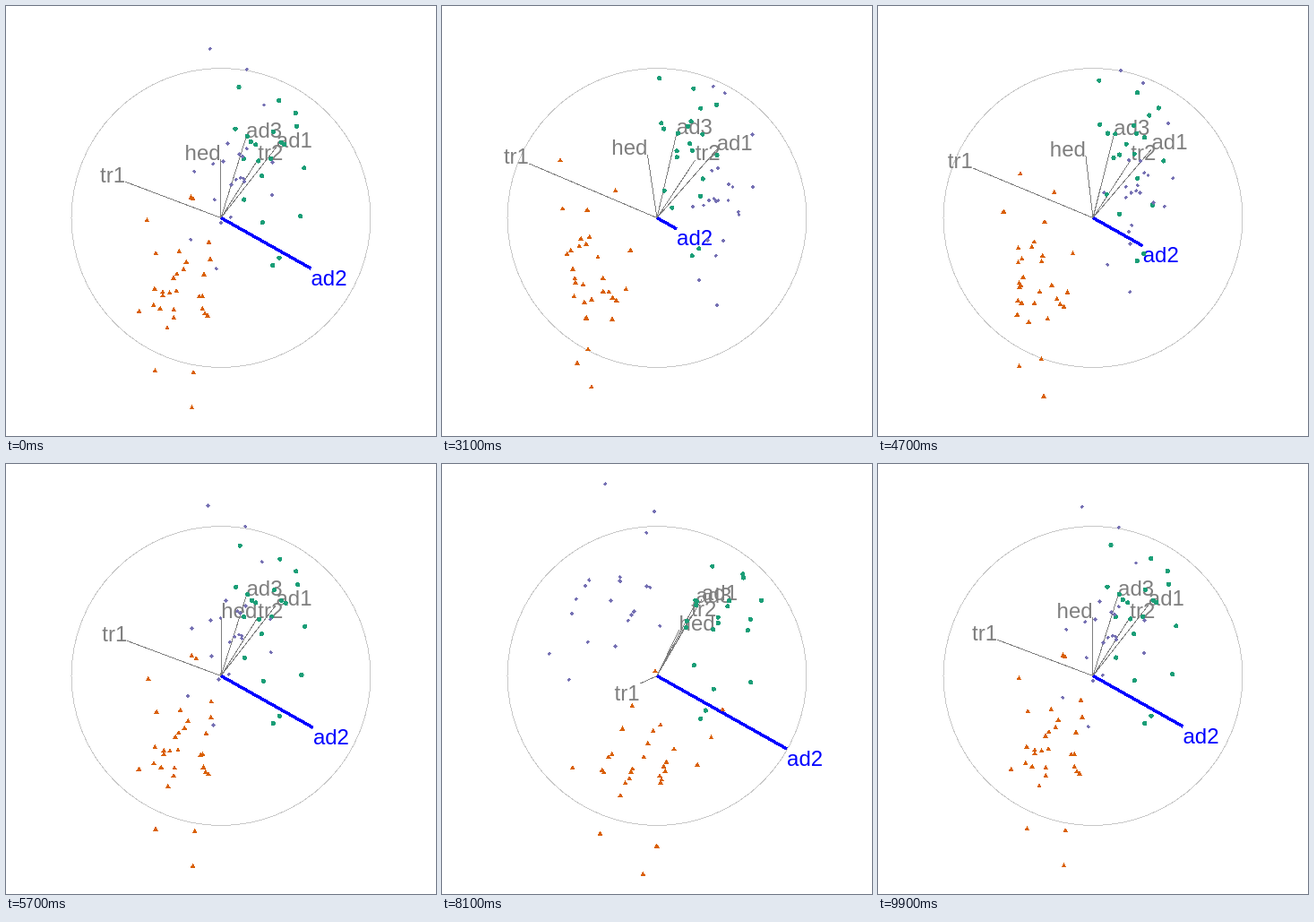
Recreate the animation shown at these times as an HTML page. Size 480x480 px, loop 10000 ms.

```html
<!DOCTYPE html>
<html lang="en">
<head>
<meta charset="utf-8">
<title>Radial tour</title>
<style>
  html, body { margin: 0; width: 100%; height: 100%; overflow: hidden; background: #fff; }
  svg { display: block; width: 480px; height: 480px; }
  text { font: 24px "Liberation Sans", Arial, sans-serif; }
  circle, line, path { shape-rendering: crispEdges; }
</style>
</head>
<body>
<svg viewBox="0 0 480 480"><circle cx="240" cy="236.5" r="167" fill="none" stroke="#c8c8c8"/></svg>
<script>
const svg = document.querySelector('svg');
const CX = 240, CY = 236.5, RADIUS = 167, MID_Y = 239.5;
const COS = 0.8716, SIN = 0.4903;   // direction of the rotated axis
const UNIT = 31.25;                 // pixels per unit of the rotated variable
const START = 0.762, TOP = Math.PI / 2;

// Axes: [label, offset across the direction, depth along it]
const axes = [
  ['tr1', 17.3, -156.2], ['tr2', -77.3, 5.5], ['ad1', -99, 21],
  ['ad3', -92.4, -27.3], ['hed', -56.5, -44.5], ['ad2', 0, 0]
];

// Points: [offset across, value of the rotated variable, depth along]
const series = [
  {
    color: '#1b9e77',
    shape: 'M-2.6 0a2.6 2.6 0 1 0 5.2 0a2.6 2.6 0 1 0 -5.2 0Z',
    points: [
      [-137, 0, -74.8], [-145.9, 1, -40.4], [-142.7, 1, -8.8], [-130.6, 2, -27.3],
      [-94.5, 0, -48.1], [-90.4, 1, -47.4], [-112.4, 1, -24.6], [-106.1, 2, -30],
      [-106.3, 1, -6.2], [-93.8, 0, -26.2], [-90.1, 0, -8.6], [-84.8, 1, -7.3],
      [-75.9, 1, -22.4], [-69.8, 0, -13.9], [-94, 2, 14.7], [-63, 0, 23.5],
      [-30.4, 1, -12.7], [-45, 3, 16.4], [-18.2, 2, -0.3], [7, 2, 48.9], [17.8, 2, 46]
    ]
  },
  {
    color: '#d95f02',
    shape: 'M0 -2.7L3 2.5H-3Z',
    points: [
      [-3.5, 3, -141.7], [-4, 0, -56.2], [42.4, 0, -98], [30, 3, -87.6],
      [61.5, 2, -73.2], [55.3, 1, -60.9], [69.9, 0, -61], [63.9, 3, -69.8],
      [78.4, 2, -76.7], [84, 2, -78.3], [45.5, 1, -13.3], [70.2, 1, -41.4],
      [95.4, 2, -64.4], [103.6, 1, -52.4], [107.1, 1, -49.6], [87.8, 2, -29.6],
      [105, 0, -36], [121.3, 1, -43.2], [100.7, 0, -12.6], [98.1, 2, -16.2],
      [86, 1, 4], [101.6, 2, -9.4], [102, 2, -4.2], [114.7, 1, -24.2],
      [121.5, 0, -25], [136.1, 1, -19.1], [135.3, -1, -9.8], [122.7, 0, 11.8],
      [165.3, 3, -9.7], [184.4, 1, -3], [200.1, 3, 14.6]
    ]
  },
  {
    color: '#7570b3',
    shape: 'M0 -2.3L2.3 0L0 2.3L-2.3 0Z',
    points: [
      [-158.5, -5, 6.5], [-158.6, -3, 12], [-133.3, -3, 62], [-75.9, -3, 42.3],
      [-81.5, -2, 42.2], [-71.8, -3, 66.3], [-71.6, -3, 71.8], [-82.4, -2, 86.7],
      [-56, -4, 79.5], [-48.4, -4, 68], [-30.4, -4, 48.4], [-45.5, -2, 51],
      [-49.8, -2, 55.4], [-50.4, -2, 60.4], [-47.9, -3, 93.4], [-37.8, -2, 48.6],
      [-50.2, -1, 81.5], [-14, -4, 97], [-6, -2, 72], [4.8, -3, 93.3],
      [37.6, -4, 95], [52, -3, 121.7]
    ]
  }
];

function add(name, attrs) {
  const el = document.createElementNS('http://www.w3.org/2000/svg', name);
  set(el, attrs);
  return svg.appendChild(el);
}

function set(el, attrs) {
  for (const key in attrs) el.setAttribute(key, attrs[key]);
}

const arms = axes.map(([label, across, depth]) => {
  const main = label === 'ad2';
  const color = main ? '#00f' : '#7f7f7f';
  const line = add('line', { x1: CX, y1: CY, stroke: color, 'stroke-width': main ? 3.6 : 1 });
  return { label, across, depth, color, line, value: main ? RADIUS : 0 };
});
for (const arm of arms) {
  arm.text = add('text', { fill: arm.color });
  arm.text.textContent = arm.label;
}
const marks = series.flatMap(({ color, shape, points }) =>
  points.map(([across, level, depth]) => ({
    across, depth, value: level * UNIT, el: add('path', { d: shape, fill: color })
  })));

// Tilt of the rotated axis: start, down to zero, up to full length, back to start
function tilt(time) {
  const step = Math.max(0, Math.floor((time - 1500) / 200));
  if (step <= 10) return START * (1 - step / 10);
  if (step <= 31) return TOP * (step - 11) / 20;
  return TOP - (TOP - START) * (step - 32) / 10;
}

function project({ across, value, depth }, angle) {
  const along = value * Math.sin(angle) + depth * Math.cos(angle);
  return [CX + along * COS - across * SIN, CY + along * SIN + across * COS];
}

function draw(now) {
  const angle = tilt(now % 10000);
  for (const arm of arms) {
    const [x, y] = project(arm, angle);
    set(arm.line, { x2: x, y2: y });
    set(arm.text, {
      x, y: y < MID_Y ? y + 0.5 : y + 18.5,
      'text-anchor': x < CX ? 'end' : 'start'
    });
  }
  for (const mark of marks) {
    set(mark.el, { transform: `translate(${project(mark, angle)})` });
  }
  requestAnimationFrame(draw);
}
draw(performance.now());
</script>
</body>
</html>
```
